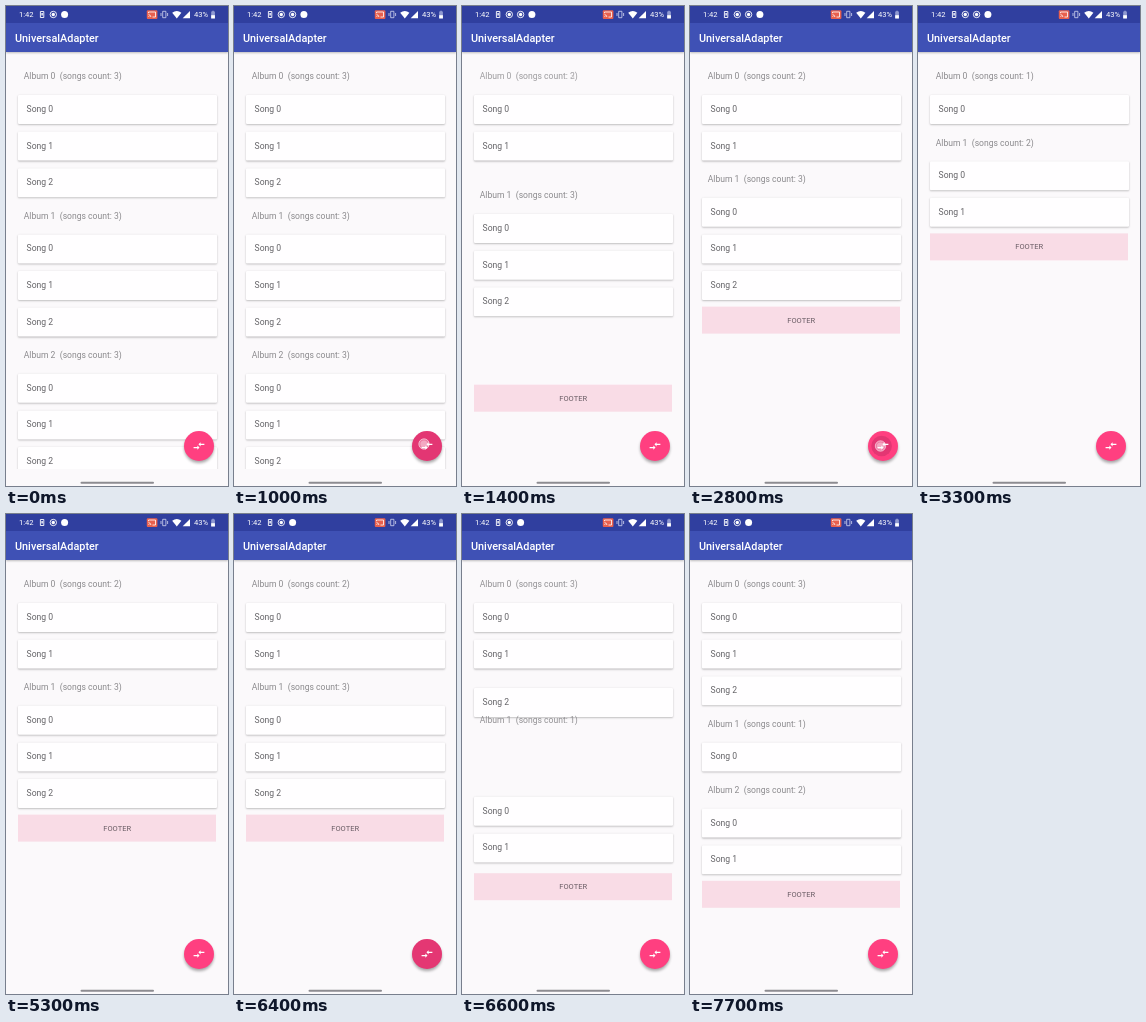
Recreate the animation shown at these times as an HTML page. Size 222 by 480 pixels, loop 7800 ms.

```html
<!DOCTYPE html>
<html lang="en">
<head>
<meta charset="utf-8">
<title>UniversalAdapter</title>
<style>
  html, body { margin: 0; width: 100%; height: 100%; overflow: hidden; }
  body { position: relative; background: #fbf9fb; font: 8.6px Roboto, sans-serif; }
  #list { position: absolute; inset: 0 0 auto; height: 463px; overflow: hidden; }
  #list div { position: absolute; left: 12px; width: 199px; box-sizing: border-box; white-space: pre; }
  .head { height: 29.6px; line-height: 29.6px; margin-top: .6px; padding-left: 5.7px; color: #8b8a8d; }
  .song { height: 29.2px; line-height: 29.2px; margin-top: 3.5px; padding-left: 8.6px; color: #636266;
          background: #fffeff; border-radius: 1px; box-shadow: 0 .8px 2px rgba(0,0,0,.28); }
  #list .foot { width: 198.4px; height: 27px; line-height: 27px; margin-top: 2.8px; font-size: 7.55px;
          text-align: center; color: #6a5d65; background: #f9dce6; }
  #bar { position: absolute; top: 0; width: 100%; height: 46px; background: linear-gradient(#303f9f 17px, #3f51b5 17px);
         box-shadow: 0 1px 2px rgba(0,0,0,.25); }
  svg { position: absolute; left: 0; top: 0; }
</style>
</head>
<body>
<div id="list"></div>
<div id="bar"></div>
<svg width="222" height="480" viewBox="0 0 222 480" fill="#fff">
  <defs>
    <g id="rec" fill="none" stroke="#fff"><circle r="3.2" stroke-width=".9"/><circle r="1.7" fill="#fff" stroke="none"/></g>
    <clipPath id="round"><circle cx="193" cy="440" r="15"/></clipPath>
    <filter id="blur" x="-50%" y="-50%" width="200%" height="200%"><feGaussianBlur stdDeviation="1.7"/></filter>
  </defs>
  <text x="13" y="11.4" font-size="7.6">1:42</text>
  <path d="M34.4 5.5h3.4v6h-3.4z" fill="none" stroke="#fff" stroke-width=".9"/><path d="M35.4 7h1.4v2.4h-1.4z"/>
  <use href="#rec" x="47.3" y="8.5"/>
  <use href="#rec" x="58.6" y="8.5" id="extra"/>
  <circle id="app" cy="8.5" r="3.5"/>

  <rect x="140.8" y="4.2" width="10.6" height="8.8" rx="1" fill="#e8604e"/>
  <path d="M142.5 7.2V6h7v5h-3M142.5 8.6q2.2.2 2.4 2.4M142.5 10.2l.8.8" fill="none" stroke="#fff" stroke-width=".8"/>
  <path d="M156.7 5.3h3.2v6.4h-3.2zM155 7v3M161.6 7v3" fill="none" stroke="#d5d9f0" stroke-width=".8"/>
  <path d="M166.2 6.8q4.6-3.6 9.2 0l-4.6 5.6z"/>
  <path d="M184 4.9v7.3h-7.3z"/>
  <text x="188" y="11.4" font-size="7.6">43%</text>
  <path d="M205.2 5.6h1v-.9h1.7v.9h1v6.8h-3.7z" fill="#8f99d0"/><path d="M205.2 9.2h3.7v3.2h-3.7z"/>
  <text x="9" y="35.7" font-size="10.85" font-weight="500">UniversalAdapter</text>

  <circle cx="193" cy="442.3" r="14.8" fill="#000" opacity=".34" filter="url(#blur)"/>
  <circle cx="193" cy="440" r="15" fill="#ff3f80"/>
  <g clip-path="url(#round)"><circle id="ripple" fill="#5a1030"/></g>
  <path transform="translate(186.5 433.5) scale(.54)" d="M9 14H2v2h7v3l4-4-4-4zm6-1v-3h7V8h-7V5l-4 4z"/>
  <g id="dot" fill-opacity=".35"><circle r="5.2" stroke="#fff" stroke-opacity=".6" stroke-width=".9"/><circle r="3.6"/></g>
  <rect x="74.5" y="475.7" width="73.5" height="2" rx="1" fill="#8d8c91"/>
</svg>
<script>
const LOOP = 7800, FADE = 120, MOVE = 250;
const $ = id => document.getElementById(id);
const clamp = x => Math.max(0, Math.min(1, x));
const ease = x => (1 - Math.cos(Math.PI * clamp(x))) / 2;

// Each word is an album, each letter a song's identity.
const states = [
  [0, 'abc def ghi'],
  [1147, 'ab def'],
  [2910, 'a de'],
  [4650, 'ab def'],
  [6406, 'abf x de']
].map(([at, albums]) => ({ at, items: layout(albums) }));

// down, up, x, y
const taps = [[790, 1090, 190, 438], [2735, 2885, 190.5, 440], [4440, 4615, 188.6, 432.4], [6180, 6345, 190, 437]];

function layout(albums) {
  const items = {};
  let y = 55.4;
  const put = (id, type, text, height) => { items[id] = { type, text, y }; y += height; };
  albums.split(' ').forEach((songs, n) => {
    put('album' + n, 'head', `Album ${n}  (songs count: ${songs.length})`, 29.6);
    [...songs].forEach((id, i) => put(id, 'song', 'Song ' + i, 36.6));
  });
  put('footer', 'foot', 'FOOTER', 34);
  return items;
}

const views = {};
function show(id, item, y, alpha) {
  const key = id + item.text;
  let el = views[key];
  if (!el) {
    el = views[key] = $('list').appendChild(document.createElement('div'));
    el.className = item.type;
    el.textContent = item.text;
  }
  el.style.transform = `translateY(${y}px)`;
  el.style.opacity = alpha;
}

function drawList(t) {
  for (const key in views) views[key].style.opacity = 0;
  const n = states.findLastIndex(s => s.at <= t);
  const to = states[n].items, from = n ? states[n - 1].items : to;
  const age = t - states[n].at;
  const wait = Object.keys(from).some(id => !to[id]) ? FADE : 0;
  const k = ease((age - wait) / MOVE);
  for (const id of new Set([...Object.keys(from), ...Object.keys(to)])) {
    const a = from[id], b = to[id];
    if (!b) show(id, a, a.y, 1 - ease(age / FADE));
    else if (!a) show(id, b, b.y, ease((age - wait - MOVE) / FADE));
    else {
      const y = a.y + (b.y - a.y) * k;
      if (a.text !== b.text) show(id, a, y, 1 - k);
      show(id, b, y, a.text === b.text ? 1 : k);
    }
  }
}

function drawTouch(t) {
  const tap = taps.find(([down, up]) => t >= down && t < up + 200);
  const ripple = $('ripple'), dot = $('dot');
  ripple.style.opacity = dot.style.opacity = 0;
  if (!tap) return;
  const [down, up, x, y] = tap;
  const grow = clamp((t - down) / 150);
  ripple.setAttribute('cx', x + (193 - x) * grow);
  ripple.setAttribute('cy', y + (440 - y) * grow);
  ripple.setAttribute('r', 5 + 12 * grow);
  ripple.style.opacity = .17 * (1 - clamp((t - up - 50) / 150));
  dot.setAttribute('transform', `translate(${x} ${y})`);
  dot.style.opacity = 1 - clamp((t - up) / 50);
}

const start = performance.now();
function frame() {
  const t = (performance.now() - start) % LOOP;
  const extra = t >= 300 && t < 4900;
  $('extra').style.opacity = +extra;
  $('app').setAttribute('cx', extra ? 69.9 : 58.6);
  drawList(t);
  drawTouch(t);
  requestAnimationFrame(frame);
}
frame();
</script>
</body>
</html>
```
